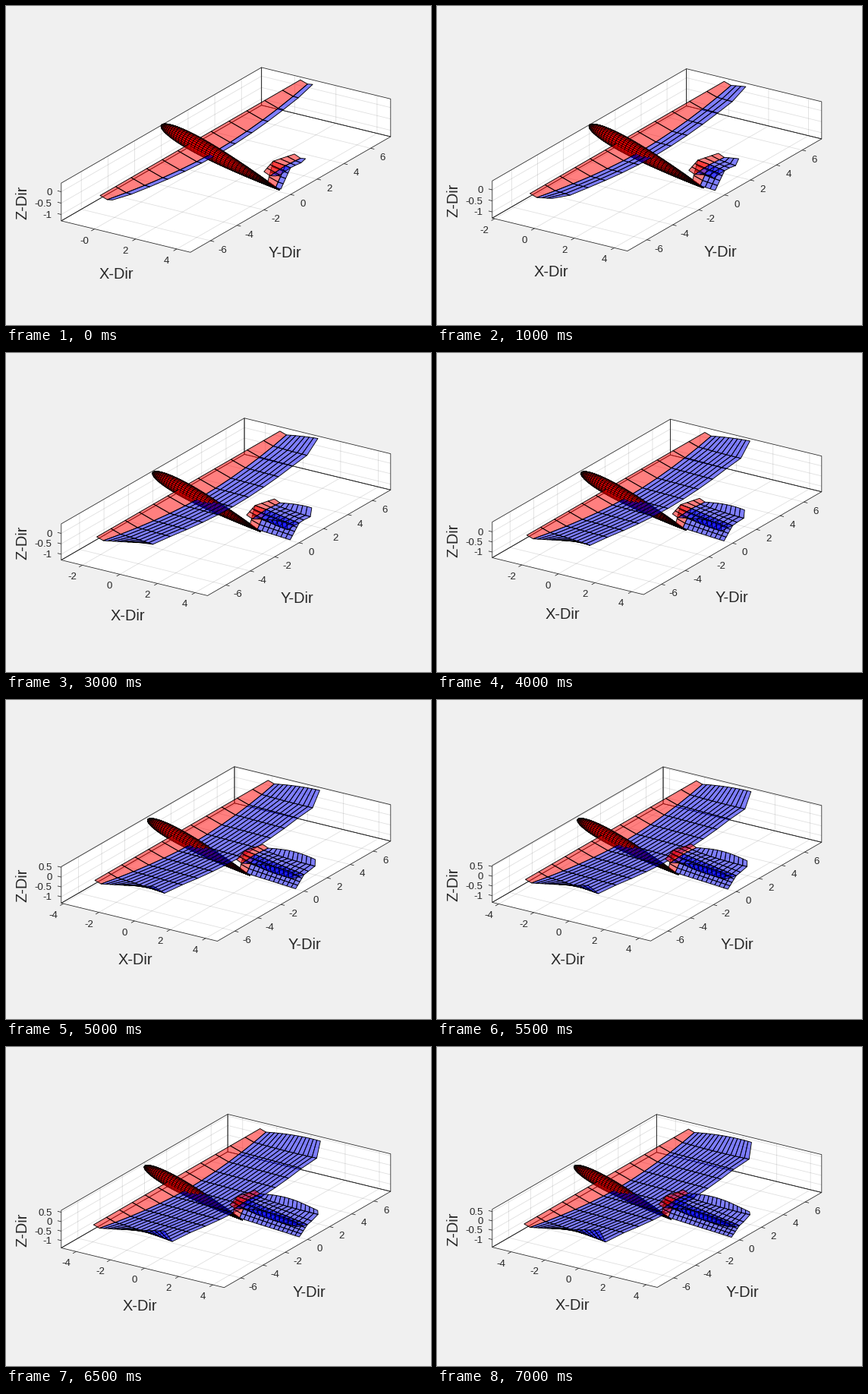
These frames come from a looping animation (560 by 420 pixels, 7500 ms). A matplotlib script:

```python
import numpy as np
import matplotlib.pyplot as plt
from matplotlib.animation import FuncAnimation
from matplotlib.collections import LineCollection, PolyCollection

W, H, DPI = 560, 420, 100
PX = 72 / DPI
FRAMES, STEP_MS = 15, 500
STEP = 0.25                      # distance flown per time step
AZ, EL = np.radians(33), np.radians(22)
RIGHT = np.array([np.cos(AZ), np.sin(AZ), 0])
DOWN = np.array([np.sin(AZ) * np.sin(EL), -np.cos(AZ) * np.sin(EL), -np.cos(EL)])
TOWARD = np.array([np.sin(AZ) * np.cos(EL), -np.cos(AZ) * np.cos(EL), np.sin(EL)])
X_MAX, Y_MAX = 4.66, 7.5
INK = (0.15, 0.15, 0.15)
RED, BLUE = (1, 0, 0, 0.5), (0, 0, 1, 0.5)

plt.rcParams["font.family"] = "Liberation Sans"
plt.rcParams["axes.unicode_minus"] = False
fig = plt.figure(figsize=(W / DPI, H / DPI), dpi=DPI, facecolor="#f0f0f0")
ax = fig.add_axes([0, 0, 1, 1])


def points(x, y, z):
    return np.stack(np.broadcast_arrays(x, y, z), axis=-1).astype(float)


def quads(grid):
    """Cells of a (rows, cols, 3) grid as (n, 4, 3)."""
    q = np.stack([grid[:-1, :-1], grid[:-1, 1:], grid[1:, 1:], grid[1:, :-1]], axis=2)
    return q.reshape(-1, 4, 3)


def make_body(rings=50, sides=24):
    nose, tail = np.array([-1.62, 0, 0.38]), np.array([4.11, 0, -1.195])
    axis = tail - nose
    length = np.linalg.norm(axis)
    up = np.array([-axis[2], 0, axis[0]]) / length
    t = (1 - np.cos(np.linspace(0, np.pi, rings + 1))) / 2
    r = 0.55 * length * (0.2969 * np.sqrt(t) - 0.126 * t - 0.3516 * t**2
                         + 0.2843 * t**3 - 0.1015 * t**4)
    a = np.linspace(0, 2 * np.pi, sides + 1)
    ring = np.cos(a)[:, None] * np.array([0, 1, 0]) + np.sin(a)[:, None] * up
    cells = quads(nose + t[:, None, None] * axis + r[:, None, None] * ring)
    return cells[np.argsort(cells.mean(axis=1) @ TOWARD)]


def make_wing():
    y = np.linspace(-Y_MAX, Y_MAX, 13)
    eta = np.abs(y) / Y_MAX
    chord = 0.35 + 0.6 * (1 - eta**1.8)
    x, z = -0.07 + 0.34 * eta, 0.25 * eta
    return points(x, y, z), points(x + chord, y, z - 0.3 * chord)


def wing_drift(age):
    """Tips roll up and in, the next station sinks and moves out."""
    dy, dz = np.zeros(13), np.full(13, -0.006 * age)
    dy[[0, -1]] = -0.0025 * age**2
    dz[[0, -1]] = 0.04 * age - 0.0005 * age**2
    dy[[1, -2]] = 0.0013 * age**2
    dz[[1, -2]] = -0.011 * age
    return points(0, dy * np.sign(np.arange(13) - 6), dz)


def make_stab(side):
    eta = np.linspace(0, 1, 4)
    y = side * 1.14 * eta
    return points(3.82 + 0.29 * eta, y, -0.01 * eta), points(4.41, y, -0.07 - 0.06 * eta)


def stab_drift(side):
    def drift(age):
        dy = side * np.array([0, 0, 0.2 * np.tanh(age / 6), -0.22 * age / 15])
        dz = [-0.038 * age, -0.032 * age, -0.28 * np.tanh(age / 6),
              0.18 * np.sin(np.pi * age / 13)]
        return points(0, dy, np.array(dz))
    return drift


def make_fin():
    h = np.linspace(0, 1, 5)
    return (points(3.55 + 0.27 * h, 0, -0.98 + 0.98 * h),
            points(3.94 + 0.47 * h, 0, -1.13 + 1.06 * h))


def fin_drift(age):
    return points(0, 0, -age * np.linspace(0.016, 0.038, 5))


BODY = make_body()
BODY_MID = BODY.mean(axis=1)
# The wing plane splits the fuselage into a covered and a visible part.
PLANE = np.interp(BODY_MID[:, 0], [-0.07, 0.88], [0, -0.29])
BODY_LOW, BODY_HIGH = BODY[BODY_MID[:, 2] < PLANE], BODY[BODY_MID[:, 2] >= PLANE]
WING = make_wing()
TAIL = [(make_stab(1), stab_drift(1)), (make_fin(), fin_drift),
        (make_stab(-1), stab_drift(-1))]


class View:
    """Orthographic equal-scale view fitted to the axes width."""

    def __init__(self, k):
        self.x0 = -1.62 - STEP * k
        self.z0 = np.interp(k, [0, 8, 14], [-1.28, -1.28, -1.41])
        self.z1 = np.interp(k, [0, 8, 14], [0.38, 0.485, 0.62])
        self.mid = np.array([(self.x0 + X_MAX) / 2, 0, (self.z0 + self.z1) / 2])
        span = RIGHT[0] * (X_MAX - self.x0) + RIGHT[1] * 2 * Y_MAX
        self.scale = 434 / span

    def __call__(self, p):
        d = (np.asarray(p, float) - self.mid) * self.scale
        return np.stack([289.8 + d @ RIGHT, 202.6 + d @ DOWN], axis=-1)


def lines(segs, color, width, z):
    ax.add_collection(LineCollection(segs, colors=[color], linewidths=width * PX, zorder=z))


def label(pos, text, size=13.3, **kw):
    kw = {"ha": "center", "va": "center", **kw}
    ax.text(*pos, text, fontsize=size * PX, color=INK, zorder=3, **kw)


def ticks(lo, hi, step):
    return np.arange(np.ceil(lo / step), np.floor(hi / step) + 1) * step


def draw_box(k, view):
    x0, x1, y0, y1, z0, z1 = view.x0, X_MAX, -Y_MAX, Y_MAX, view.z0, view.z1
    walls = [
        [(x0, y0, z0), (x1, y0, z0), (x1, y1, z0), (x0, y1, z0)],
        [(x0, y0, z0), (x0, y1, z0), (x0, y1, z1), (x0, y0, z1)],
        [(x0, y1, z0), (x1, y1, z0), (x1, y1, z1), (x0, y1, z1)],
    ]
    ax.add_collection(PolyCollection([view(w) for w in walls], facecolors="white",
                                     edgecolors="none", zorder=0))
    xs, ys, zs = ticks(x0, x1, 2), ticks(y0, y1, 2), ticks(z0, z1, 0.5)
    grid = [[(x, y0, z0), (x, y1, z0), (x, y1, z1)] for x in xs]
    grid += [[(x1, y, z0), (x0, y, z0), (x0, y, z1)] for y in ys]
    grid += [[(x0, y0, z), (x0, y1, z), (x1, y1, z)] for z in zs]
    lines([view(g) for g in grid], (*INK, 0.15), 0.8, 1)
    lines([view(w + w[:1]) for w in walls], INK, 0.8, 2)

    def tick(p, direction):
        a = view(p)
        d = direction / np.hypot(*direction)
        lines([[a, a + 5 * d]], INK, 0.8, 2)
        return a

    x_dir = np.array([RIGHT[0], DOWN[0]])
    y_dir = np.array([RIGHT[1], DOWN[1]])
    for x in xs:
        label(tick((x, y0, z0), -y_dir) + (-13.5, 16), f"{x:.0f}")
    for y in ys:
        label(tick((x1, y, z0), x_dir) + (16, 12.8), f"{y:.0f}")
    for z in zs:
        a = tick((x0, y0, z), -x_dir)
        label((60.5, a[1] - 0.3), f"{z:g}", ha="right", va="center_baseline")

    mx, my, mz = view.mid
    label(view((mx, y0, z0)) + (-12.5 + 0.7 * k, 49.5 + 0.1 * k), "X-Dir", 20)
    label(view((x1, my, z0)) + (-7 + 0.75 * k, 77 - 0.57 * k), "Y-Dir", 20)
    label((22, view((x0, y0, mz))[1] + 0.7), "Z-Dir", 20, rotation=90)


def mesh(view, cells, color, z, width=0.9):
    ax.add_collection(PolyCollection(view(cells), facecolors=[color], edgecolors="black",
                                     linewidths=width * PX, zorder=z))


def draw_surface(k, view, surface, drift, z):
    shift = np.array([-STEP * k, 0, 0])
    front, rear = surface
    wake = [rear + shift + (STEP * age, 0, 0) + drift(age) for age in range(k + 2)]
    mesh(view, quads(np.array([front, rear]) + shift), RED, z)
    mesh(view, quads(np.array(wake)), BLUE, z + 0.1)


def draw(k):
    ax.clear()
    ax.set(xlim=(0, W), ylim=(H, 0))
    ax.axis("off")
    view = View(k)
    shift = np.array([-STEP * k, 0, 0])
    draw_box(k, view)
    mesh(view, BODY_LOW + shift, (1, 0, 0, 1), 4, 0.7)
    draw_surface(k, view, WING, wing_drift, 5)
    mesh(view, BODY_HIGH + shift, (1, 0, 0, 1), 6, 0.7)
    for i, (surface, drift) in enumerate(TAIL):
        draw_surface(k, view, surface, drift, 7 + i)
    return []


anim = FuncAnimation(fig, draw, frames=FRAMES, interval=STEP_MS, repeat=True)
plt.show()
```
